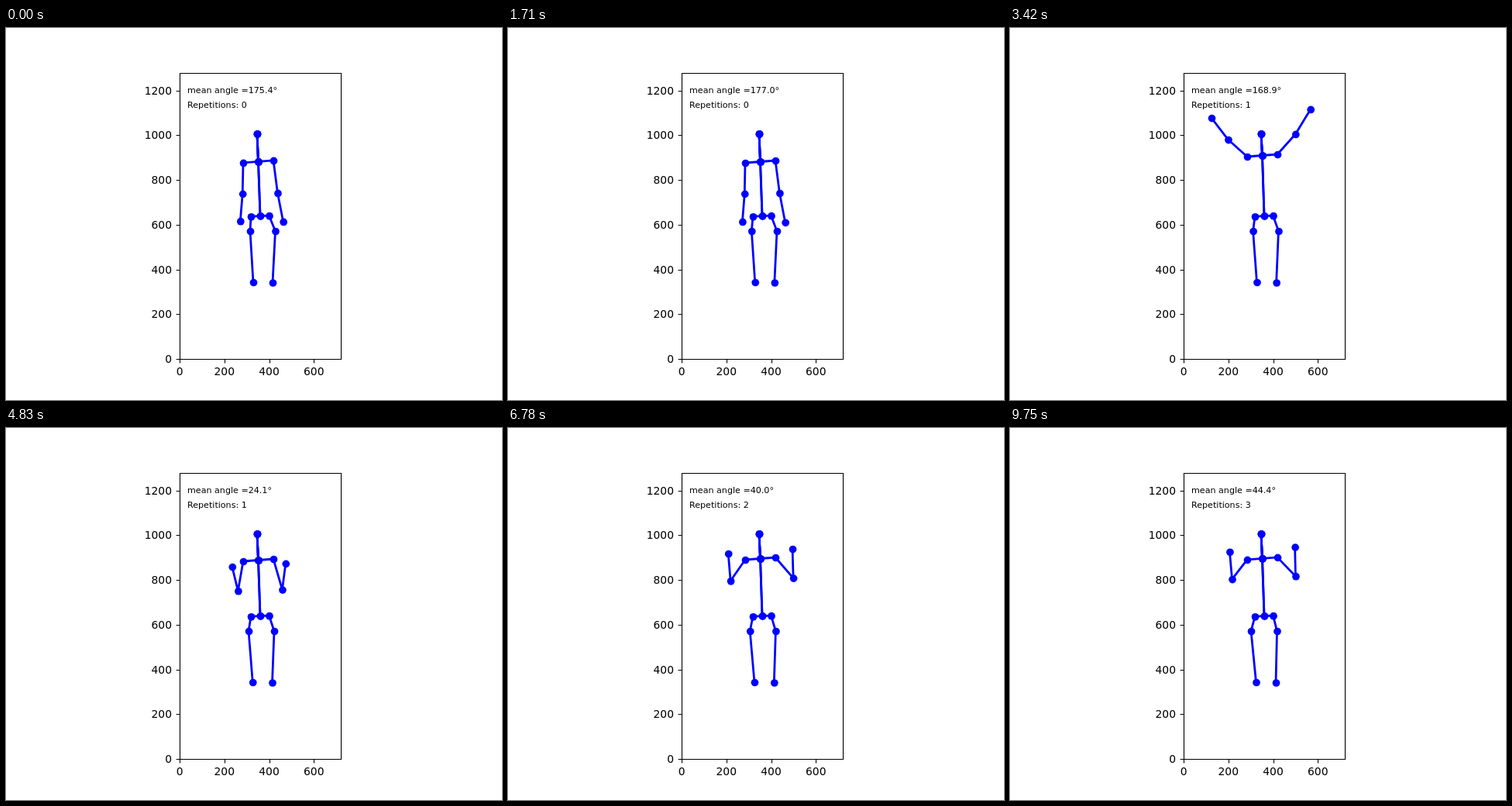
Recreate the animation shown at these times as an HTML page. Size 640 by 480 pixels, loop 9780 ms.

```html
<!DOCTYPE html>
<html lang="en">
<head>
<meta charset="utf-8">
<style>
  html, body { margin: 0; width: 100%; height: 100%; overflow: hidden; background: #fff; }
  svg { display: block; width: 640px; height: 480px; font-family: "DejaVu Sans", sans-serif; }
  #axes { font-size: 13.89px; }
  #axes path { fill: none; stroke: #000; stroke-width: 1.11; }
  #readout { font-size: 11.11px; }
  polyline {
    fill: none; stroke: #00f; stroke-width: 2.78; stroke-linejoin: round;
    marker-start: url(#dot); marker-mid: url(#dot); marker-end: url(#dot);
  }
</style>
</head>
<body>
<svg viewBox="0 0 640 480">
  <defs>
    <marker id="dot" markerUnits="userSpaceOnUse" markerWidth="10" markerHeight="10" overflow="visible">
      <circle cx="0.5" cy="0.5" r="4.86" fill="#00f"/>
    </marker>
  </defs>
  <g id="axes"></g>
  <g id="body"></g>
  <g id="readout">
    <text id="angle" x="234" y="84"></text>
    <text id="reps" x="234" y="103"></text>
  </g>
</svg>
<script>
const LOOP = 9780, STEP = 30, SCALE = 0.28875, LEFT = 224.05, BOTTOM = 427.2;
const REP_ANGLE = 100;
const byId = id => document.getElementById(id);
const lerp = (a, b, k) => a + (b - a) * k;
const midpoint = (p, q) => p.map((v, i) => lerp(v, q[i], 0.5));

// Stages of the press; joints are measured outward and upward from the shoulder.
const stages = [
  { elbow: [3, -41], wrist: [8, -78],   angle: 177 },
  { elbow: [9, -39], wrist: [15, -6.5], angle: 24.1 },
  { elbow: [21, -27], wrist: [22, 9.5], angle: 40 },
  { elbow: [27.5, 4], wrist: [31.5, 41], angle: 103.7 },
  { elbow: [24, 24], wrist: [44.5, 54], angle: 168.9 }
];

// Turning points of the motion: time and stage, eased in between.
const turns = [
  [0, 0.0105], [1710, 0], [1980, 0], [2400, 1],
  [3100, 4], [3420, 4], [4400, 1], [4830, 1],
  [5500, 3.5], [7754, 1], [8576, 3.5], [10717, 1]
];

function stageAt(t) {
  const next = turns.findIndex(turn => turn[0] > t);
  const [t0, from] = turns[next - 1], [t1, to] = turns[next];
  const k = (t - t0) / (t1 - t0);
  return lerp(from, to, k * k * (3 - 2 * k));
}

function blendStages(stage) {
  const i = Math.min(Math.floor(stage), stages.length - 2);
  const a = stages[i], b = stages[i + 1], k = stage - i;
  const blend = name => a[name].map((v, axis) => lerp(v, b[name][axis], k));
  return { elbow: blend("elbow"), wrist: blend("wrist"), angle: lerp(a.angle, b.angle, k) };
}

const angleAt = t => blendStages(stageAt(t)).angle;

// A repetition counts each time the elbows open past the threshold.
function repsAt(t) {
  let reps = 0;
  for (let s = STEP; s <= t; s += STEP) {
    if (angleAt(s - STEP) < REP_ANGLE && angleAt(s) >= REP_ANGLE) reps++;
  }
  return reps;
}

// Side is -1 for left, 1 for right; the right arm leans higher and reaches further.
function placeJoint(shoulder, [x, y], side) {
  const lean = 0.055 * side, reach = 1 + 0.03 * side;
  const out = (x * Math.cos(lean) - y * Math.sin(lean)) * reach;
  const up = (x * Math.sin(lean) + y * Math.cos(lean)) * reach;
  return [shoulder[0] + side * out, shoulder[1] - up];
}

function drawAxes() {
  let path = "M224.5 58.5H432.5V427.5H224.5Z", labels = "";
  for (let v = 0; v <= 600; v += 200) {
    const x = LEFT + v * SCALE;
    path += `M${Math.round(x) + 0.5} 427.5v4.9`;
    labels += `<text x="${x}" y="448" text-anchor="middle">${v}</text>`;
  }
  for (let v = 0; v <= 1200; v += 200) {
    const y = Math.round(BOTTOM - v * SCALE);
    path += `M224.5 ${y + 0.5}h-4.9`;
    labels += `<text x="214" y="${y + 5}" text-anchor="end">${v}</text>`;
  }
  byId("axes").innerHTML = `<path d="${path}"/>${labels}`;
}

function render(t) {
  const stage = stageAt(t), drift = t / LOOP;
  const { elbow, wrist, angle } = blendStages(stage);
  const head = [324, 136.5], pelvis = [328, 242.4];
  const leftShoulder = [306, 174 - 2 * stage], rightShoulder = [345, 171 - 2 * stage];
  const neck = midpoint(leftShoulder, rightShoulder);
  const arm = (shoulder, side) =>
    [shoulder, placeJoint(shoulder, elbow, side), placeJoint(shoulder, wrist, side)];
  const chains = [
    arm(leftShoulder, -1),
    arm(rightShoulder, 1),
    [pelvis, [316, 243.3], [315 - 4 * drift, 262], [319 - 1.5 * drift, 328]],
    [pelvis, [339.5, 242.2], [347.5 - 3 * drift, 262], [344 - drift, 328.5]]
  ];
  chains.forEach((chain, i) => limbs[i].setAttribute("points", [head, neck, ...chain].join(" ")));
  byId("angle").textContent = `mean angle =${angle.toFixed(1)}°`;
  byId("reps").textContent = `Repetitions: ${repsAt(t)}`;
}

drawAxes();
byId("body").innerHTML = "<polyline/>".repeat(4);
const limbs = byId("body").children;
const start = performance.now();

function tick() {
  const t = (performance.now() - start) % LOOP;
  render(Math.floor(t / STEP) * STEP);
  requestAnimationFrame(tick);
}
tick();
</script>
</body>
</html>
```
